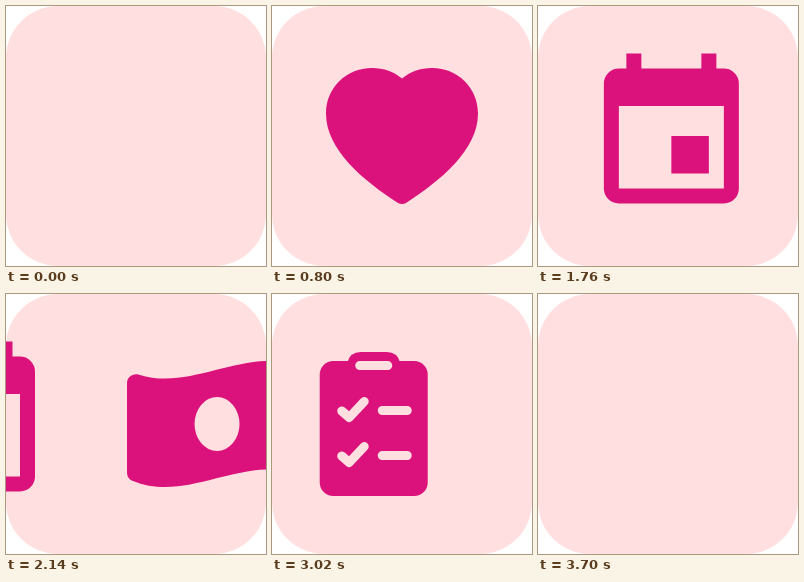
Recreate the animation shown at these times as an HTML page. Size 260 by 260 pixels, loop 3820 ms.

```html
<!DOCTYPE html>
<html lang="en">
<head>
<meta charset="utf-8">
<title>Icon carousel</title>
<style>
html, body { margin: 0; width: 100%; height: 100%; overflow: hidden; background: #fff; }
svg { display: block; width: 100vw; height: 100vh; }
.icon { fill: #db127b; }
.hole { fill: #ffdfe0; }
.line { fill: none; stroke: #ffdfe0; stroke-linecap: round; stroke-linejoin: round; }
</style>
</head>
<body>
<svg viewBox="0 0 260 260">
  <rect class="hole" width="260" height="260" rx="52"/>

  <!-- eye -->
  <g class="icon" data-enter="329">
    <path d="M60 126C76 101 101 85 130 85S184 101 200 126Q202.500 130.500 200 135C184 160 159 176 130 176S76 160 60 135Q57.500 130.500 60 126Z"/>
    <circle class="hole" cx="130" cy="130.500" r="30"/>
    <circle cx="130" cy="130.500" r="17"/>
  </g>

  <!-- heart -->
  <g class="icon" data-enter="334">
    <path d="M130 72.500C122 66 112 62 100 62C74 62 54 82 54 107.500C54 144 92 175 126 197Q130 199 134 197C168 175 206 144 206 107.500C206 82 186 62 160 62C148 62 138 66 130 72.500Z"/>
  </g>

  <!-- video camera -->
  <g class="icon" data-enter="333">
    <rect x="55" y="85" width="105" height="90" rx="30"/>
    <path d="M159 112.500L176 96Q179.500 92.500 185 92.500H192Q205 92.500 205 105.500V154.500Q205 167.500 192 167.500H185Q179.500 167.500 176 164L159 147.500Z"/>
    <circle class="hole" cx="92.500" cy="137.500" r="7.500"/>
  </g>

  <!-- calendar -->
  <g class="icon" data-enter="325">
    <g transform="translate(40 40) scale(7.5)">
      <path d="M6 1h2v3H6zM16 1h2v3h-2z"/>
      <rect x="3" y="3" width="18" height="18" rx="2"/>
      <path class="hole" d="M5 8h14v11H5z"/>
      <path d="M12 12h5v5h-5z"/>
    </g>
  </g>

  <!-- banknote -->
  <g class="icon" data-enter="348">
    <g transform="translate(40 58) scale(.28125)">
      <path d="M621 54.500C582 38 543.500 32 505 32C382 32 258 94.300 135 94.300C104 94.300 73.500 90.400 42.600 80.600C20 75 0 90 0 111V428C0 441 7 453 19 457.500C57.600 474 96.500 480 135 480C258 480 382 417.700 505 417.700C536 417.700 566.500 421.600 597.400 431.400C620 437 640 422 640 401V84C640 71 633 59.500 621 54.500Z"/>
      <ellipse class="hole" cx="320" cy="256" rx="80" ry="96"/>
    </g>
  </g>

  <!-- checklist -->
  <g class="icon" data-enter="312">
    <rect x="76" y="67" width="108" height="135" rx="13.500"/>
    <path d="M103.500 69Q106 58 117 58H143Q154 58 156.500 69Z"/>
    <path class="line" stroke-width="9" d="M116 71.500h28M138.500 116.500h25M138.500 161.500h25"/>
    <path class="line" stroke-width="9" d="M98 117l7.500 6.500 15-16M98 162l7.500 6.500 15-16"/>
  </g>

  <!-- monitor -->
  <g class="icon" data-enter="326">
    <g transform="translate(40 40) scale(7.5)">
      <rect x="1" y="2" width="22" height="16" rx="2"/>
      <path d="M10 18h4v2h2v2H8v-2h2z"/>
      <path class="hole" d="M3 4h18v12H3z"/>
      <path d="M5 6h9v5H5zM15 6h4v2h-4zM15 9h4v5h-4zM5 12h4v2H5zM10 12h4v2h-4z"/>
    </g>
  </g>
</svg>
<script>
const LOOP = 3820, SLOT = 500, MOVE = 300, EXIT = 260;
const icons = [...document.querySelectorAll('.icon')];

// CSS-style cubic-bezier, solved by bisection
function bezier(x1, y1, x2, y2) {
  const at = (a, b, s) => 3 * a * s * (1 - s) ** 2 + 3 * b * s * s * (1 - s) + s ** 3;
  return x => {
    if (x <= 0) return 0;
    if (x >= 1) return 1;
    let lo = 0, hi = 1;
    for (let i = 0; i < 24; i++) {
      const mid = (lo + hi) / 2;
      if (at(x1, x2, mid) < x) lo = mid; else hi = mid;
    }
    return at(y1, y2, lo);
  };
}
const ease = bezier(.25, .1, .25, 1);
const easeOut = bezier(0, 0, .58, 1);

function draw(now) {
  const t = now % LOOP;
  icons.forEach((icon, i) => {
    const age = t - i * SLOT;
    const x = age < SLOT
      ? icon.dataset.enter * (1 - ease(age / MOVE))
      : -EXIT * easeOut((age - SLOT) / MOVE);
    icon.style.display = age >= 0 && age < SLOT + MOVE ? '' : 'none';
    icon.setAttribute('transform', `translate(${x.toFixed(2)} 0)`);
  });
}

let start;
function tick(now) {
  start ??= now;
  draw(now - start);
  requestAnimationFrame(tick);
}
draw(0);
requestAnimationFrame(tick);
</script>
</body>
</html>
```
